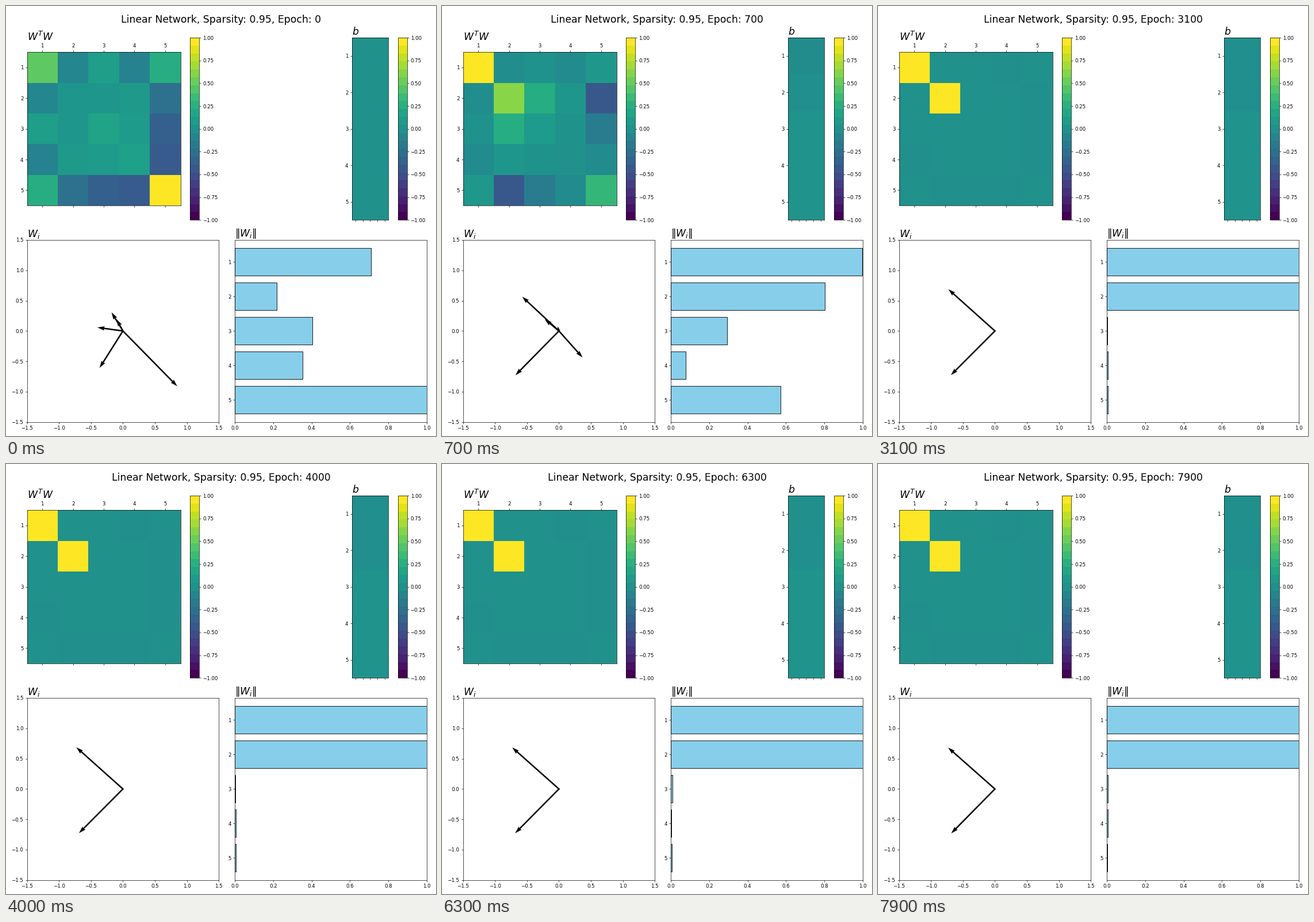
Animation, 748 px wide and 748 px high, one loop 8 s. Source, as a matplotlib script:

```python
import matplotlib.pyplot as plt
import numpy as np
from matplotlib.animation import FuncAnimation
from matplotlib.cm import ScalarMappable
from matplotlib.colors import Normalize

SIZE, FRAMES, STEP_MS = 748, 80, 100
N = 5
INDEX = np.arange(1, N + 1)

# Each feature's length runs from START to END and settles after SPAN steps
START = np.array([.71, .218, .403, .354, 1.245])
END = np.array([1.001, 1.001, 0, 0, 0])
SPAN = np.array([8, 16, 15, 15, 18])
POWER = np.array([2, 2.4, .5, 2.4, 1.58])
# Directions in degrees
TURN_FROM = np.array([239, 117.3, 171.7, 120.2, -47])
TURN_TO = np.array([226.3, 136.4, 137, 104, -50])

# Training noise keeps the unused features just above zero
NOISE = np.random.default_rng(3).uniform(.002, .008, (FRAMES, N))


def fade(k, span, power):
    """Falls from 1 to 0 over the span, slowing down for power > 1."""
    return np.clip(1 - k / span, 0, 1) ** power


def weights(k):
    norm = END + (START - END) * fade(k, SPAN, POWER)
    norm = np.maximum(norm, NOISE[k])
    angle = TURN_TO + (TURN_FROM - TURN_TO) * fade(k, 9, 2) + .008 * k
    angle = np.radians(angle)
    return norm * np.array([np.cos(angle), np.sin(angle)])


def biases(k):
    goal = np.full(N, .025)
    goal[:2] = -.045 * np.exp(-k / 25), -.01
    return goal * min(1, k / 4)


# Panel edges in pixels from the top left
WIDE, TALL = 333.7, 317.2
LEFT, RIGHT = 36.55, 398.05
TOP, LOWER = 55.05, 406.95


def add_axes(x, y, w, h, title=None):
    ax = fig.add_axes([x / SIZE, 1 - (y + h) / SIZE, w / SIZE, h / SIZE])
    if title:
        ax.set_title(title, loc="left", fontsize=20)
    return ax


def heat_panel(x, data, title):
    """Heatmap of square cells, set against a colour bar."""
    rows, cols = data.shape
    w = .8 * WIDE if cols > 1 else TALL / N
    h = w * rows / cols
    ax = add_axes(x + .8 * WIDE - w, TOP + (TALL - h) / 2, w, h, title)
    edges = np.arange(N + 1) + .5
    mesh = ax.pcolormesh(edges if cols > 1 else [-.5, .5], edges, data,
                         cmap="viridis", vmin=-1, vmax=1)
    ax.set_ylim(N + .5, .5)
    ax.set_yticks(INDEX)
    shades = ScalarMappable(Normalize(-1, 1), plt.get_cmap("viridis", 23))
    cax = add_axes(x + .85 * WIDE, TOP, TALL / 20, TALL)
    fig.colorbar(shades, cax=cax, ticks=np.linspace(-1, 1, 9))
    return ax, mesh


fig = plt.figure(figsize=(12, 12), dpi=SIZE / 12, facecolor="white")
title = fig.suptitle("", fontsize=20)
w0 = weights(0)

ax_gram, gram = heat_panel(LEFT, w0.T @ w0, "$W^TW$")
ax_gram.set_xticks(INDEX)
ax_gram.tick_params(axis="x", top=True, labeltop=True, labelbottom=False)

ax_bias, bias = heat_panel(RIGHT, biases(0)[:, None], "$b$")
ax_bias.set_xticks(np.linspace(-.4, .4, 5), [""] * 5)

ax_vec = add_axes(LEFT, LOWER, WIDE, TALL - .5, "$W_i$")
ticks = np.linspace(-1.5, 1.5, 7)
ax_vec.set(xlim=(-1.5, 1.5), ylim=(-1.5, 1.5), xticks=ticks, yticks=ticks)
arrows = ax_vec.quiver(np.zeros(N), np.zeros(N), *w0,
                       angles="xy", scale_units="xy", scale=1)

ax_norm = add_axes(RIGHT, LOWER, WIDE, TALL - .5, r"$\|W_i\|$")
bars = ax_norm.barh(INDEX, np.hypot(*w0), color="skyblue", edgecolor="black")
ax_norm.set(xlim=(0, 1), ylim=(5.64, .36), yticks=INDEX)


def update(k):
    w = weights(k)
    title.set_text(f"Linear Network, Sparsity: 0.95, Epoch: {100 * k}")
    gram.set_array(w.T @ w)
    bias.set_array(biases(k)[:, None])
    arrows.set_UVC(*w)
    for bar, length in zip(bars, np.hypot(*w)):
        bar.set_width(length)
    return title, gram, bias, arrows, *bars


anim = FuncAnimation(fig, update, frames=FRAMES, interval=STEP_MS,
                     repeat=True, repeat_delay=0, blit=False)
plt.show()
```
